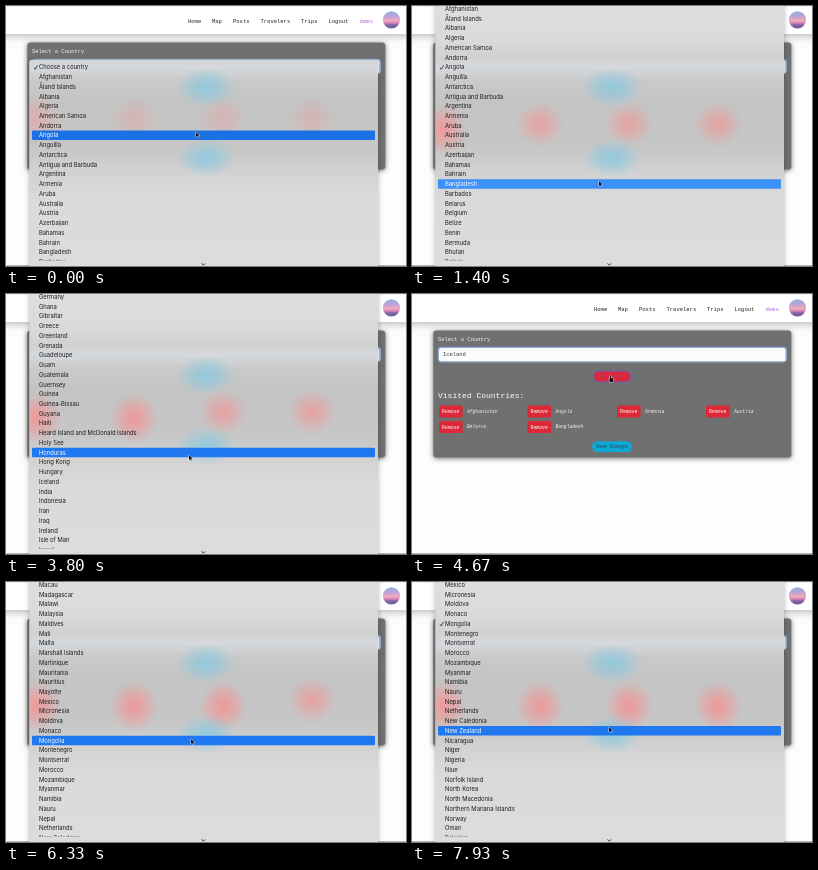
An HTML page with a canvas that plays this animation: 400 px wide and 260 px high, repeating every 8 s.

```html
<!DOCTYPE html>
<html lang="en">
<head>
<meta charset="utf-8">
<title>Visited countries</title>
<style>
html, body { margin: 0; width: 100%; height: 100%; overflow: hidden; background: #fdfdfd; }
canvas { display: block; width: 400px; height: 260px; }
</style>
</head>
<body>
<canvas id="stage"></canvas>
<script>
const W = 400, H = 260, LOOP = 8000;
const canvas = document.getElementById('stage');
const ctx = canvas.getContext('2d');
const dpr = window.devicePixelRatio || 1;
canvas.width = W * dpr;
canvas.height = H * dpr;

const MONO = '"Liberation Mono", monospace';
const SANS = 'Inter, sans-serif';
const RED = '#dc2837', CYAN = '#0ca9d6';
const ROW = 9.73, ANCHOR = 61.3;

const countries = `Choose a country,Afghanistan,Åland Islands,Albania,Algeria,American Samoa,Andorra,Angola,Anguilla,Antarctica,Antigua and Barbuda,Argentina,Armenia,Aruba,Australia,Austria,Azerbaijan,Bahamas,Bahrain,Bangladesh,Barbados,Belarus,Belgium,Belize,Benin,Bermuda,Bhutan,Bolivia,Bosnia and Herzegovina,Botswana,Bouvet Island,Brazil,British Indian Ocean Territory,Brunei,Bulgaria,Burkina Faso,Burundi,Cambodia,Cameroon,Canada,Cape Verde,Cayman Islands,Central African Republic,Chad,Chile,China,Christmas Island,Cocos Islands,Colombia,Comoros,Congo,Cook Islands,Costa Rica,Croatia,Cuba,Curaçao,Cyprus,Czechia,Denmark,Djibouti,Dominica,Dominican Republic,Ecuador,Egypt,El Salvador,Equatorial Guinea,Eritrea,Estonia,Eswatini,Ethiopia,Falkland Islands,Faroe Islands,Fiji,Finland,France,French Guiana,French Polynesia,Gabon,Gambia,Georgia,Germany,Ghana,Gibraltar,Greece,Greenland,Grenada,Guadeloupe,Guam,Guatemala,Guernsey,Guinea,Guinea-Bissau,Guyana,Haiti,Heard Island and McDonald Islands,Holy See,Honduras,Hong Kong,Hungary,Iceland,India,Indonesia,Iran,Iraq,Ireland,Isle of Man,Israel,Italy,Jamaica,Japan,Jersey,Jordan,Kazakhstan,Kenya,Kiribati,Kuwait,Kyrgyzstan,Laos,Latvia,Lebanon,Lesotho,Liberia,Libya,Liechtenstein,Lithuania,Luxembourg,Macau,Madagascar,Malawi,Malaysia,Maldives,Mali,Malta,Marshall Islands,Martinique,Mauritania,Mauritius,Mayotte,Mexico,Micronesia,Moldova,Monaco,Mongolia,Montenegro,Montserrat,Morocco,Mozambique,Myanmar,Namibia,Nauru,Nepal,Netherlands,New Caledonia,New Zealand,Nicaragua,Niger,Nigeria,Niue,Norfolk Island,North Korea,North Macedonia,Northern Mariana Islands,Norway,Oman,Pakistan,Palau,Panama`.split(',');
const at = name => countries.indexOf(name);

const visited = ['Afghanistan', 'Angola', 'Armenia', 'Austria', 'Belarus', 'Bangladesh', 'Iceland', 'Mongolia'];
const columns = [27, 115.5, 205, 294];
const clicks = [640, 2530, 4720, 6800];

// Each menu opens on its checked row, then scrolls by whole rows.
const menus = [
  { open: -500, close: 230, checked: 0, blue: '#1b70e3', tint: 0.5 },
  { open: 1000, close: 1860, checked: at('Angola'), blue: '#3c90fa' },
  { open: 2900, close: 4130, checked: at('Bangladesh'), blue: '#1f78ef',
    scroll: [3000, 3740, at('Guadeloupe')] },
  { open: 5270, close: 6400, checked: at('Iceland'), blue: '#1f78ef',
    scroll: [5680, 6200, at('Mongolia') - 10] },
  { open: 7230, close: 9000, checked: at('Mongolia'), blue: '#1f78ef',
    scroll: [7760, 7930, at('Montserrat')] }
];

// Pointer path: time, x, y
const path = [
  [0, 190, 126], [200, 190, 128], [580, 199, 82], [700, 199, 82], [950, 194, 61],
  [1060, 193, 62], [1380, 187, 175], [1880, 187, 176], [2420, 198, 81.5], [2640, 198, 81.5],
  [2860, 195, 62], [2960, 194, 64], [3350, 184, 160], [3800, 183, 161], [3990, 184, 187],
  [4140, 184, 187], [4600, 198, 82], [4800, 198, 82], [5160, 193, 62], [5290, 192, 63],
  [5560, 185, 155], [6420, 185, 157], [6720, 198, 82], [6900, 198, 82], [7110, 197, 62],
  [7260, 197, 62], [7680, 197, 145], [8000, 197, 145]
];

const clamp = v => Math.max(0, Math.min(1, v));
const ease = v => { v = clamp(v); return v * v * (3 - 2 * v); };

function pointerAt(t) {
  const i = Math.max(1, path.findIndex(p => p[0] >= t));
  const [a, b] = [path[i - 1], path[i]];
  const k = ease((t - a[0]) / (b[0] - a[0]));
  return { x: a[1] + (b[1] - a[1]) * k, y: a[2] + (b[2] - a[2]) * k };
}

function text(str, x, y, size, color, family = MONO, style = '') {
  ctx.font = `${style} ${size}px ${family}`;
  ctx.fillStyle = color;
  ctx.fillText(str, x, y);
}

function box(x, y, w, h, r, fill, stroke) {
  ctx.beginPath();
  ctx.roundRect(x, y, w, h, r);
  if (fill) { ctx.fillStyle = fill; ctx.fill(); }
  if (stroke) { ctx.strokeStyle = stroke; ctx.lineWidth = 1; ctx.stroke(); }
}

function shadowed(color, blur, dy, draw) {
  ctx.save();
  ctx.shadowColor = color;
  ctx.shadowBlur = blur * dpr;
  ctx.shadowOffsetY = dy * dpr;
  draw();
  ctx.restore();
}

function gradient(y0, y1, stops) {
  const g = ctx.createLinearGradient(0, y0, 0, y1);
  stops.forEach(([p, c]) => g.addColorStop(p, c));
  return g;
}

function drawNav() {
  shadowed('rgba(0,0,0,.28)', 8, 1.5, () => box(-10, -10, 420, 38, 0, '#fff'));
  ctx.fillStyle = '#ececec';
  ctx.fillRect(0, 0, W, 1);
  const links = { Home: 182, Map: 206, Posts: 227, Travelers: 254.5, Trips: 295, Logout: 322.5 };
  for (const [label, x] of Object.entries(links)) text(label, x, 15.5, 5.5, '#222');
  text('demo', 353.5, 15.5, 5.5, '#b565dc');
  ctx.beginPath();
  ctx.arc(385.5, 13.8, 8.6, 0, Math.PI * 2);
  ctx.fillStyle = gradient(5, 22.5, [[0, '#8faee0'], [0.3, '#b9a5d8'], [0.55, '#f0a9bd'],
    [0.68, '#d987b8'], [0.8, '#8264a8'], [1, '#6d5a9c']]);
  ctx.fill();
}

function drawPanel(t, count, value, focus, hover) {
  shadowed('rgba(0,0,0,.55)', 5, 1, () => box(21.3, 36.5, 358, 127, 3, '#707070'));
  text('Select a Country', 26, 46, 5.45, '#f4f4f4');
  if (focus === 'select') box(26.3, 53.3, 348, 14.6, 2.5, null, '#8fbdf5');
  box(27, 54, 346.6, 13.3, 2, '#fcfcfc');
  text(value, 31, 61, 5.45, '#333');

  const hot = hover || focus === 'button';
  box(181.8, 77.2, 36.8, 10.6, 5.3, hot ? RED : CYAN, hot ? '#7b4fb8' : null);
  if (!hot) text('Add Country', 185.3, 82.8, 4.5, '#234a58');
  else if (hover) text('Add Country', 185.3, 82.8, 4.5, '#b33a6c');

  text('Visited Countries:', 26, 102, 8, '#fff');
  visited.slice(0, count).forEach((name, i) => {
    const x = columns[i % 4], y = i < 4 ? 117.6 : 133;
    box(x, y - 6, 23.6, 12, 1.5, RED);
    text('Remove', x + 3, y + 0.3, 4.8, '#fff');
    text(name, x + 28, y + 0.2, 4.65, '#f2f2f2', MONO, 'italic');
  });
  box(180, 147.2, 40, 10.8, 5.4, CYAN);
  text('Save Changes', 184, 152.8, 4.5, '#26424e');
}

function glow(x, y, rx, ry, rgb, alpha) {
  ctx.save();
  ctx.translate(x, y);
  ctx.scale(rx, ry);
  const g = ctx.createRadialGradient(0, 0, 0, 0, 0, 1);
  g.addColorStop(0, `rgba(${rgb},${alpha})`);
  g.addColorStop(0.45, `rgba(${rgb},${alpha * 0.65})`);
  g.addColorStop(1, `rgba(${rgb},0)`);
  ctx.fillStyle = g;
  ctx.fillRect(-1, -1, 2, 2);
  ctx.restore();
}

function drawBackdrop(menu, top, count) {
  ctx.fillStyle = gradient(0, H, [[0, '#dedede'], [0.13, '#dadada'], [0.2, '#d0d1d2'], [0.235, '#d6d9dd'],
    [0.29, '#c9c9c9'], [0.36, '#c4c4c4'], [0.54, '#c6c6c6'], [0.64, '#d2d2d2'], [0.74, '#dadada'], [1, '#dcdcdc']]);
  ctx.fillRect(23, top, 350, H - top);
  const tint = menu.tint || 1;
  [31, 128, 217, 306].forEach((x, i) => {
    const rows = count > i + 4 ? 2 : 1;
    const y = tint < 1 ? 113 : rows === 2 ? 124 : 118;
    glow(x, y, 24, rows === 2 ? 25 : 22, '250,140,140', (rows === 2 ? 0.75 : 0.6) * tint);
  });
  glow(200, 81, 30, 20, '125,200,228', 0.7);
  glow(200, 152, 30, 19, '125,200,228', 0.7);
}

function drawMenu(menu, t, count, pointer) {
  const [from, to, end] = menu.scroll || [0, 1, menu.checked];
  const first = Math.round(menu.checked + (end - menu.checked) * ease((t - from) / (to - from)));
  const top = Math.max(-4, ANCHOR - 7.5 - first * ROW);
  const hovered = first + Math.round((pointer.y - ANCHOR) / ROW);
  const rowY = i => ANCHOR + (i - first) * ROW;

  ctx.save();
  ctx.globalAlpha = 1 - clamp((t - menu.close) / 140);
  shadowed('rgba(0,0,0,.3)', 5, 1, () => box(23.5, top, 348.5, H + 10 - top, 2.5, '#d8d8d8'));
  ctx.save();
  box(23.5, top, 348.5, H + 10 - top, 2.5);
  ctx.clip();
  drawBackdrop(menu, top, count);
  ctx.restore();

  ctx.beginPath();
  ctx.rect(23, 0, 350, 254.6);
  ctx.clip();
  if (hovered >= 0) box(26, rowY(hovered) - 4.8, 343, 9.5, 1, menu.blue);
  for (let i = Math.max(0, first - 7); i < first + 21 && i < countries.length; i++) {
    const color = i === hovered ? '#fff' : '#1c1c1c';
    text(countries[i], 33, rowY(i) + 0.3, 5.85, color, SANS);
    if (i !== menu.checked) continue;
    ctx.beginPath();
    ctx.moveTo(28, rowY(i) + 0.4);
    ctx.lineTo(29.2, rowY(i) + 2);
    ctx.lineTo(31.6, rowY(i) - 2);
    ctx.strokeStyle = color;
    ctx.lineWidth = 0.8;
    ctx.stroke();
  }
  ctx.restore();

  if (t < menu.close) {
    ctx.beginPath();
    ctx.moveTo(195.6, 257.4);
    ctx.lineTo(197.4, 259.2);
    ctx.lineTo(199.2, 257.4);
    ctx.strokeStyle = '#222';
    ctx.lineWidth = 0.9;
    ctx.stroke();
  }
}

function drawPointer({ x, y }, hand) {
  const arrow = [0, 0, 0, 5, 1.1, 4, 1.9, 5.8, 2.8, 5.4, 2, 3.7, 3.5, 3.6];
  const finger = [0, 0, 0.9, 0, 1.1, 2, 3.3, 2.6, 3.2, 4.6, 2.6, 6, 0.2, 6, -1.5, 3.6, -1, 3.1, 0, 3.8];
  const pts = hand ? finger : arrow;
  ctx.beginPath();
  for (let i = 0; i < pts.length; i += 2) ctx.lineTo(x + pts[i], y + pts[i + 1]);
  ctx.closePath();
  ctx.strokeStyle = 'rgba(255,255,255,.85)';
  ctx.lineWidth = 0.9;
  ctx.stroke();
  ctx.fillStyle = '#111';
  ctx.fill();
}

function draw(t) {
  const pointer = pointerAt(t);
  const count = 5 + clicks.slice(1).filter(c => t >= c).length;
  const menu = menus.find(m => t >= m.open && t < m.close + 140);
  const last = menus.filter(m => t >= m.open).pop();
  const chosen = menus[menus.indexOf(last) + (t >= last.close ? 1 : 0)].checked;
  const focus = clicks.some(c => c > last.open && c <= t) ? 'button' : 'select';
  const hover = !menu && Math.abs(pointer.x - 200.3) < 18.5 && Math.abs(pointer.y - 82.5) < 5.5;

  ctx.setTransform(dpr, 0, 0, dpr, 0, 0);
  ctx.textBaseline = 'middle';
  ctx.fillStyle = '#fdfdfd';
  ctx.fillRect(0, 0, W, H);
  drawNav();
  drawPanel(t, count, countries[chosen], focus, hover);
  ctx.fillStyle = '#b5b5b5';
  ctx.fillRect(0, 259, W, 1);
  if (menu) drawMenu(menu, t, count, pointer);
  drawPointer(pointer, hover);
}

function tick() {
  draw(performance.now() % LOOP);
  requestAnimationFrame(tick);
}
tick();
</script>
</body>
</html>
```
